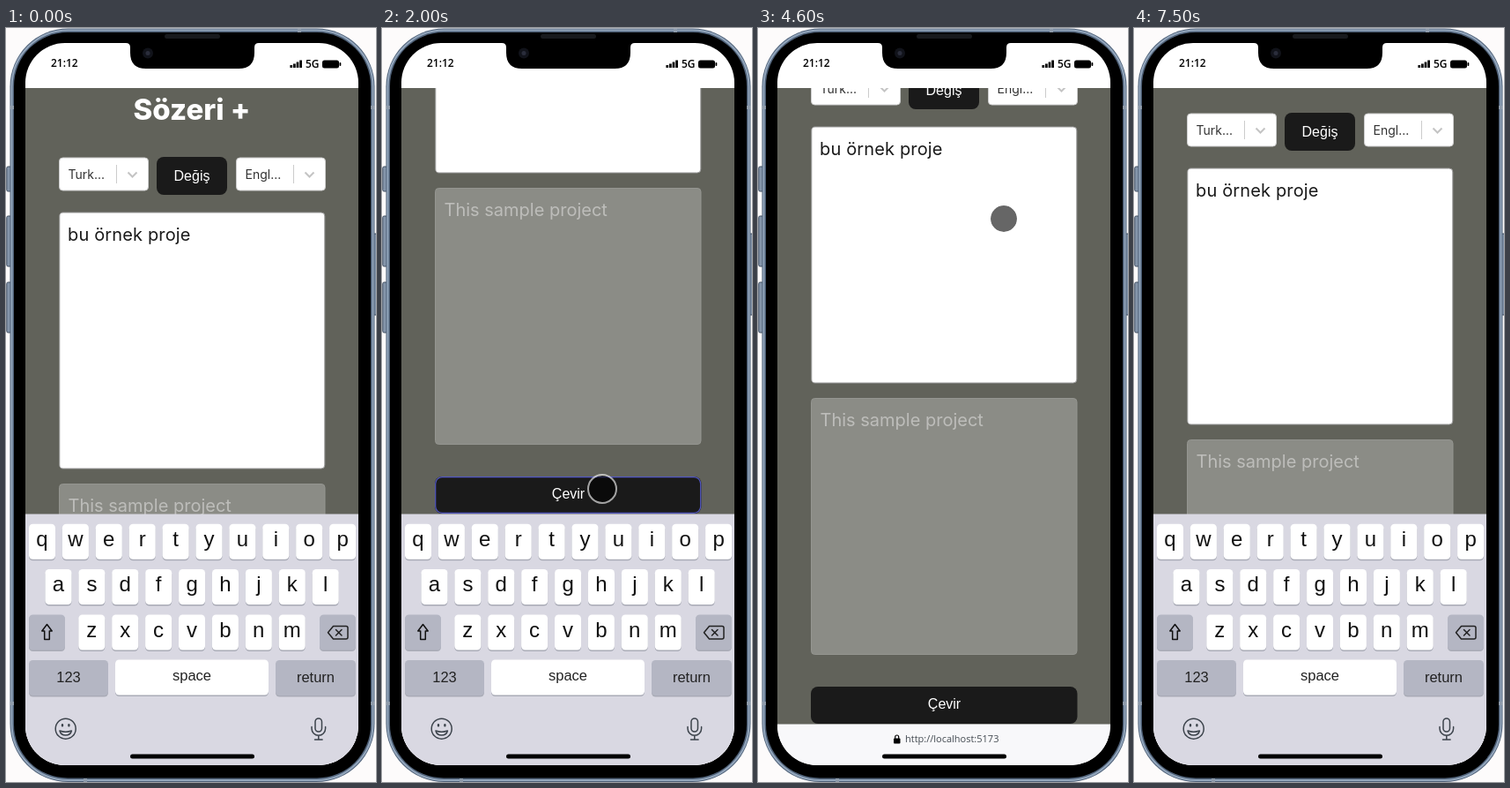
Write an HTML page that moves like this. It is 420 px wide and 854 px high and loops after 7600 ms.

```html
<!DOCTYPE html>
<html lang="tr">
<head>
<meta charset="utf-8">
<title>Sözeri +</title>
<style>
  html, body { margin: 0; width: 100%; height: 100%; overflow: hidden; background: #fdfbfb; }
  svg { display: block; width: 100%; height: 100%; }
  text { white-space: pre; }
  .body { font: 20px Inter, sans-serif; }
  .pick { font: 14px Inter, sans-serif; fill: #333; }
  .btn { font: 16px "Liberation Sans", Arial, sans-serif; fill: #fff; text-anchor: middle; }
  .key { font: 24px "Liberation Sans", Arial, sans-serif; fill: #111; text-anchor: middle; }
  .word { font-size: 16.5px; fill: #222; }
  .status { font: 600 12px "Open Sans", sans-serif; }
  .line { fill: none; stroke: #3c434b; stroke-width: 1.5; stroke-linecap: round; stroke-linejoin: round; }
</style>
</head>
<body>
<svg viewBox="0 0 420 854">
  <defs>
    <clipPath id="screen"><rect x="22" y="17" width="378" height="818" rx="45"/></clipPath>
    <clipPath id="view"><rect x="22" y="68" width="378" height="721"/></clipPath>
  </defs>

  <g fill="#8495aa" stroke="#3d4b5d">
    <rect x=".8" y="157" width="6" height="28" rx="1.5"/>
    <rect x=".8" y="213" width="6" height="57" rx="1.5"/>
    <rect x=".8" y="288" width="6" height="57" rx="1.5"/>
    <rect x="416" y="233" width="6" height="92" rx="1.5"/>
  </g>
  <rect x="4.5" y=".5" width="414" height="853.5" rx="66" fill="#506279"/>
  <rect x="6.5" y="2.5" width="410" height="849.5" rx="64" fill="none" stroke="#93a6bc" stroke-width="2"/>
  <path d="M5 90h5M5 765h5M413 90h5M413 765h5M333 1v4M90 850v4" stroke="#8e9bab" stroke-width="4"/>
  <rect x="9" y="5" width="405" height="844.5" rx="61"/>
  <rect x="180" y="7" width="63" height="5" rx="2.5" fill="#181a1d"/>

  <g clip-path="url(#screen)">
    <rect x="22" y="17" width="378" height="818" fill="#fff"/>
    <g clip-path="url(#view)">
      <rect x="22" y="68" width="378" height="721" fill="#61625a"/>
      <g id="page">
        <text x="211" y="104" text-anchor="middle" fill="#fff" style="font:800 33px Inter,sans-serif">Sözeri +</text>
        <g id="picks"></g>
        <rect x="171" y="146" width="80" height="43" rx="8" fill="#1a1a1a"/>
        <text class="btn" x="211" y="173">Değiş</text>
        <rect x="60.8" y="209" width="301" height="290" rx="4" fill="#fff" stroke="#999"/>
        <g id="focus" fill="none">
          <rect x="60" y="208" width="303" height="292" rx="5" stroke="#fff"/>
          <rect x="61.2" y="209.3" width="300.6" height="289.4" rx="4" stroke="#101010" stroke-width="1.8"/>
        </g>
        <text class="body" x="70" y="241" fill="#1a1a1a" letter-spacing=".15">bu örnek proje</text>
        <path id="caret" d="M211.5 223v24" stroke="#111"/>
        <rect x="60.5" y="516.5" width="301.5" height="290" rx="4" fill="#8b8c86" stroke="#949590"/>
        <text class="body" x="70.5" y="548" fill="#bdbdba">This sample project</text>
        <rect x="60" y="843" width="302.5" height="42" rx="8" fill="#1a1a1a"/>
        <rect id="hover" x="60.7" y="843.7" width="301" height="40.6" rx="7.5" fill="none" stroke="#5358c4" stroke-width="1.2"/>
        <text class="btn" x="211.5" y="868">Çevir</text>
      </g>
    </g>

    <rect x="22" y="788.5" width="378" height="47" fill="#f8f8fa"/>
    <rect x="154" y="804.5" width="7.5" height="6" rx="1"/>
    <path d="M155.7 805v-2a2 2 0 0 1 4 0v2" fill="none" stroke="#000" stroke-width="1.2"/>
    <text x="167" y="809" fill="#444b52" style="font:11px 'Open Sans',sans-serif">http://localhost:5173</text>

    <g id="board">
      <rect x="22" y="550.5" width="378" height="286" fill="#d9d8e2"/>
      <g id="keys"></g>
      <path class="line" style="stroke:#111" d="M46.5 675.5l-5.7 7.5h2.9v9.5h5.6v-9.5h2.9z"/>
      <path class="line" style="stroke:#222" d="M371.5 677.5H386a2 2 0 0 1 2 2V690a2 2 0 0 1-2 2H371.5L365.5 684.8zM374.5 681.5l6.5 6.5M381 681.5l-6.5 6.5"/>
      <g class="line">
        <circle cx="67.7" cy="793.7" r="11.5"/>
        <path d="M61 796q6.7 2.4 13.4 0q-1.2 5-6.7 5t-6.7-5z"/>
        <path d="M64 789.3v1M71.4 789.3v1" stroke-width="2.4"/>
        <rect x="351" y="782" width="7.5" height="15" rx="3.75"/>
        <path d="M347 791.5v2a7.8 7.8 0 0 0 15.6 0v-2M354.8 801.5v4.5M350.5 806h8.6"/>
      </g>
    </g>
    <rect x="141" y="822.5" width="141" height="5" rx="2.5"/>

    <text class="status" x="51" y="44.3">21:12</text>
    <text class="status" x="340" y="45">5G</text>
    <path d="M323.8 45v-3M327.4 45v-4.5M331 45v-6.5M334.6 45v-8.5" stroke="#000" stroke-width="2.7"/>
    <rect x="359" y="36.5" width="19" height="9" rx="2.5"/>
    <rect x="378.5" y="39" width="1.8" height="4" rx=".8"/>
    <path d="M136 17q5 0 5 5v6q0 18 18 18h105q18 0 18-18v-6q0-5 5-5z"/>
    <circle cx="161" cy="28.5" r="6" fill="#11131a"/>
    <circle cx="161" cy="28.5" r="2.5" fill="#2a2d3b"/>

    <g id="cursor">
      <circle r="15" fill="#000" fill-opacity=".6"/>
      <circle r="16" fill="none" stroke="#fff" stroke-opacity=".6" stroke-width="2"/>
    </g>
  </g>
</svg>
<script>
const LOOP = 7600, STEP = 100, PAGE_END = 885;
const el = id => document.getElementById(id);

el('picks').innerHTML = [[60.5, 'Turk...'], [261.5, 'Engl...']].map(([x, label]) => `
  <rect x="${x}" y="147" width="101" height="37" rx="4" fill="#fff" stroke="#ccc"/>
  <text class="pick" x="${x + 10}" y="171">${label}</text>
  <path d="M${x + 65} 155v21" stroke="#ccc"/>
  <path d="M${x + 78} 163.5l5 5 5-5" fill="none" stroke="#c4c4c4" stroke-width="2"/>`).join('');

function key(x, y, w, label, base, dark, style = 'key') {
  const box = (dy, fill) => `<rect x="${x}" y="${y + dy}" width="${w}" height="40" rx="4.5" fill="${fill}"/>`;
  return box(1.5, '#a9abb6') + box(0, dark ? '#b4b6c3' : '#fff') +
    `<text class="${style}" x="${x + w / 2}" y="${base}">${label}</text>`;
}
const row = (letters, x, y) =>
  [...letters].map((c, i) => key(x + i * 37.9, y, 30, c, y + 25.3)).join('');
el('keys').innerHTML =
  row('qwertyuiop', 26, 561.7) + row('asdfghjkl', 44.5, 613) + row('zxcvbnm', 82.3, 664.5) +
  key(26, 664.5, 41, '', 0, true) + key(356, 664.5, 41, '', 0, true) +
  key(26, 716, 90, '123', 741, true, 'key word') +
  key(124, 715.5, 174, 'space', 739, false, 'key word') +
  key(306, 716, 91, 'return', 741, true, 'key word');

// Linear track of [time, ...values]; holds its first and last points.
function track(t, points) {
  const i = points.findIndex(p => p[0] > t);
  if (i < 0) return points[points.length - 1].slice(1);
  if (i === 0) return points[0].slice(1);
  const a = points[i - 1], b = points[i], k = (t - a[0]) / (b[0] - a[0]);
  return a.slice(1).map((v, n) => v + (b[n + 1] - v) * k);
}

const scrollDown = [[1000, 0], [1100, 18], [1200, 95], [1300, 185], [1400, 265], [1500, 315], [1600, 335]];
const scrollBack = [[4700, 97], [5100, 50]];
const boardTop = [[2100, 550], [2500, 838], [4700, 838], [5100, 550]];
const hover = [[1800, 0], [2000, 1], [2200, 1], [2500, 0], [2900, 0], [3100, 1], [3400, 1], [3700, 0]];
const path = [
  [100, 440, 330], [400, 286, 314], [1500, 286, 314], [1800, 256, 490], [2000, 250, 522],
  [2800, 250, 522], [3100, 233, 767], [3400, 233, 767], [3800, 250, 610], [4200, 280, 330],
  [4600, 279, 216], [4800, 274, 200], [5600, 274, 200], [5900, 320, 225], [6300, 440, 280]
];

function draw(now) {
  const t = Math.floor(now % LOOP / STEP) * STEP;
  const between = (a, b) => t >= a && t < b;
  const [top] = track(t, boardTop);
  const scroll = t < 4700
    ? Math.min(track(t, scrollDown)[0], PAGE_END - Math.min(top, 788))
    : track(t, scrollBack)[0];
  const [x, y] = track(t, path);

  el('page').setAttribute('transform', `translate(0 ${-scroll})`);
  el('board').setAttribute('transform', `translate(0 ${top - 550})`);
  el('cursor').setAttribute('transform', `translate(${x} ${y})`);
  el('hover').setAttribute('opacity', track(t, hover)[0]);
  el('focus').setAttribute('opacity', +between(4800, 7500));
  el('caret').setAttribute('opacity', +(between(4800, 5300) || between(5900, 6400) || between(6900, 7400)));
}

const start = performance.now();
function tick() {
  draw(performance.now() - start);
  requestAnimationFrame(tick);
}
tick();
</script>
</body>
</html>
```
